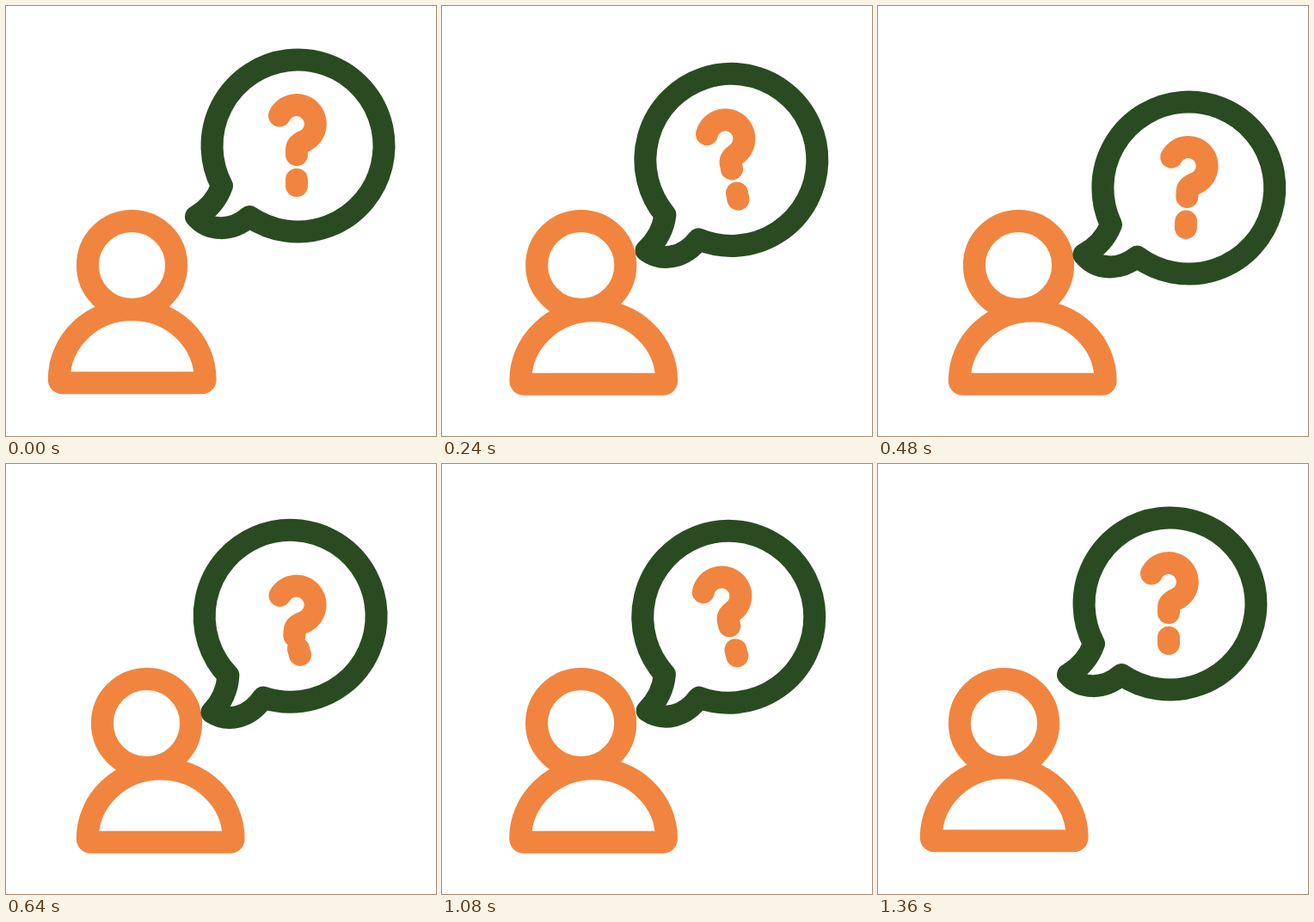
Animation, 500 px wide and 500 px high, one loop 1480 ms. Source, as an HTML page:

```html
<!DOCTYPE html>
<html lang="en">
<head>
<meta charset="utf-8">
<title>Question</title>
<style>
  html, body { margin: 0; width: 100%; height: 100%; overflow: hidden; background: #fff; }
  svg { display: block; width: 100vw; height: 100vh; }
  g { fill: none; stroke-width: 26; stroke-linecap: round; stroke-linejoin: round; }
  .orange { stroke: #f1853f; }
  .green { stroke: #2a4b22; }
</style>
</head>
<body>
<svg viewBox="0 0 500 500">
  <g class="orange">
    <path id="body" d="M66 438.3Q61.8 438.3 61.8 434A84.9 81 0 0 1 231.6 434Q231.6 438.3 227.4 438.3z"/>
    <circle id="head" cx="146.5" cy="301.5" r="51.6"/>
  </g>
  <g id="bubble">
    <path class="green" d="M251 209Q243 232 221 245C236 262 262 263 283 245A100 100 0 1 0 251 209z"/>
    <path id="hook" class="orange" d="M318 127.5A22 22 0 1 1 346.2 157.4Q338 161 338 167V173"/>
    <path id="dot" class="orange" d="M338 201.7V209"/>
  </g>
</svg>
<script>
const LOOP = 1480, STEP = 40;

// Eased 0 to 1 between two times.
function ramp(t, from, to) {
  const u = Math.min(1, Math.max(0, (t - from) / (to - from)));
  return u * u * (3 - 2 * u);
}

function place(id, x, y, angle = 0, cx = 0, cy = 0) {
  document.getElementById(id).setAttribute(
    "transform", `translate(${x} ${y}) rotate(${angle} ${cx} ${cy})`);
}

function draw(t) {
  const enter = ramp(t, 80, 280);
  const leave = ramp(t, 1010, 1350);

  // The person leans in and back.
  const lean = enter - leave;
  place("body", 33 * lean, 1.5 * lean);
  place("head", 17 * lean, 0);

  // The bubble follows and rocks around the tip of its tail.
  const follow = enter - ramp(t, 1040, 1360);
  const rock = ramp(t, 240, 440) - ramp(t, 440, 640);
  const tilt = 16.5 * rock - 12 * ramp(t, 80, 240) - 4 * ramp(t, 440, 640) + 16 * leave;
  place("bubble", 18.5 * follow, 44 * follow, tilt, 220, 245);

  // The hook drops, swings back and settles while the dot spins.
  const drop = ramp(t, 480, 640), rebound = ramp(t, 640, 880), settle = ramp(t, 880, 1040);
  const swing = 20 * drop - 24 * rebound + 4 * settle;
  const sag = 15 * drop - 12 * rebound - 3 * settle;
  place("hook", 0.6 * swing, sag, swing, 338, 137);
  place("dot", 0, 0, -180 * ramp(t, 640, 1080), 338, 205.4);
}

const start = performance.now();
function tick() {
  const t = (performance.now() - start) % LOOP;
  draw(Math.floor(t / STEP) * STEP);
  requestAnimationFrame(tick);
}
tick();
</script>
</body>
</html>
```
